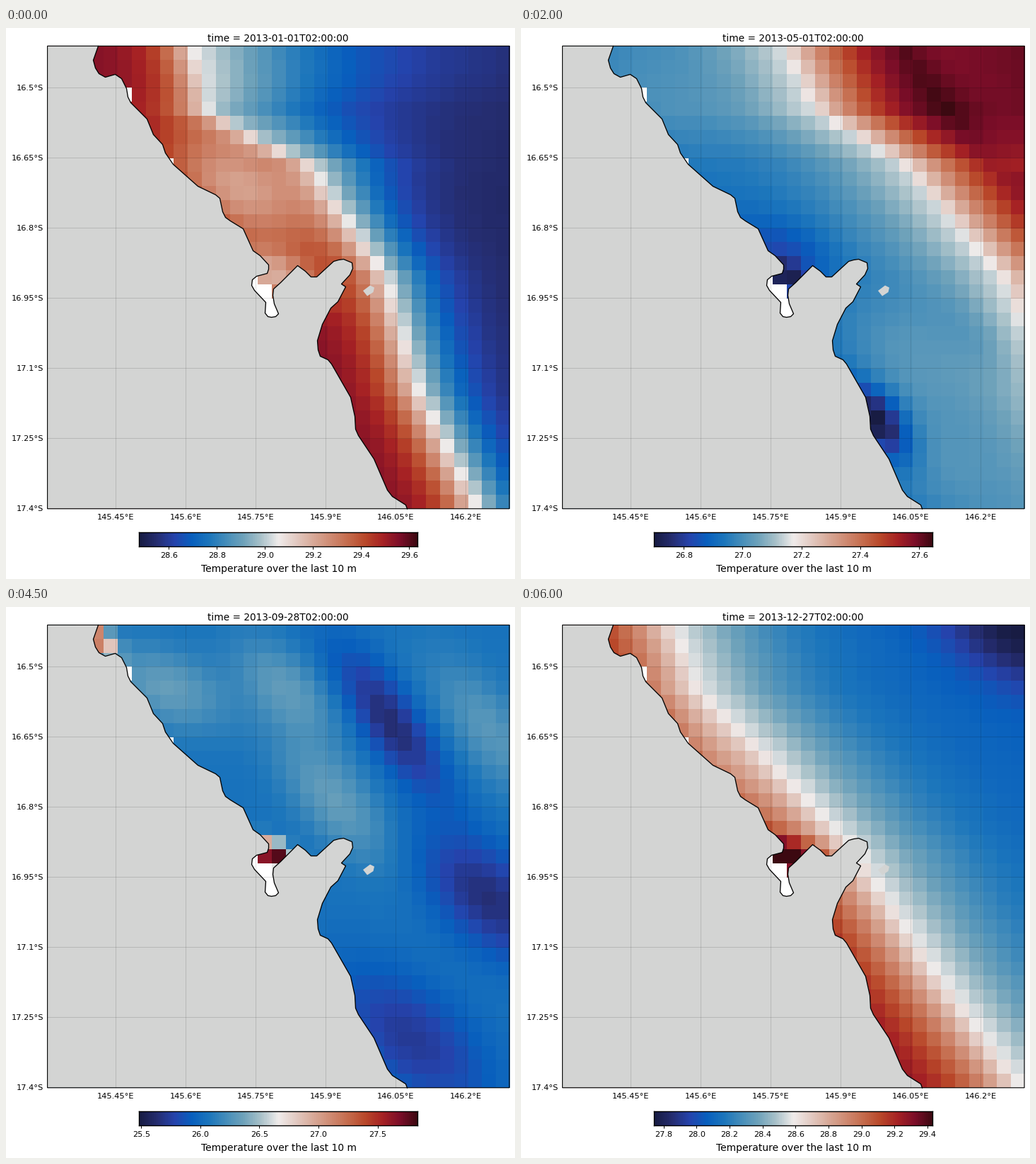
Recreate the animation shown at these times as a matplotlib script. Size 720 by 778 pixels, loop 6.5 s.

```python
import numpy as np
import matplotlib.pyplot as plt
from matplotlib.animation import FuncAnimation
from matplotlib.colors import LinearSegmentedColormap
from matplotlib.patches import Polygon, Rectangle
from matplotlib.path import Path

W, H, DPI = 720, 778, 64
PX = 72 / DPI                      # points per pixel
LEFT, RIGHT, TOP, BOTTOM = 58.6, 712, 25.4, 678.8
N = 33                             # cells per side
CELL = (RIGHT - LEFT) / N
STEPS, INTERVAL = 13, 500
START = np.datetime64("2013-01-01T02:00:00")

plt.rcParams["font.family"] = "DejaVu Sans"

# Diverging blue-white-red colour map
STOPS = ["#181c43", "#252d70", "#2643ac", "#085fbe", "#1c76bc", "#468eba",
         "#70a3bb", "#aac2ca", "#f0eceb", "#e3cbc3", "#d8aa99", "#cf8b73",
         "#c56c4d", "#b9482a", "#a62224", "#7c0e29", "#3c0911"]
CMAP = LinearSegmentedColormap.from_list("thermal", STOPS)

# Coastline in pixels, from north to south
COAST = np.array([
    (130, 25), (123, 45), (126, 56), (131, 64), (140, 69), (154, 65),
    (163, 71), (170, 85), (172, 97), (176, 105), (199, 128), (208, 150),
    (221, 164), (225, 176), (236, 192), (271, 223), (296, 235), (302, 240),
    (306, 259), (310, 267), (317, 272), (335, 283), (349, 314), (359, 321),
    (371, 334), (371, 340), (369, 346), (354, 350), (348, 355), (347, 363),
    (351, 370), (367, 387), (366, 402), (370, 407), (375, 408), (381, 407),
    (385, 403), (379, 389), (377, 377), (378, 368), (388, 359), (412, 335),
    (423, 343), (431, 351), (439, 351), (463, 329), (470, 327), (477, 326),
    (489, 331), (490, 339), (486, 348), (474, 361), (480, 365), (469, 386),
    (459, 395), (447, 418), (440, 441), (441, 454), (444, 463), (455, 468),
    (460, 474), (487, 521), (493, 548), (494, 566), (498, 575), (520, 608),
    (539, 652), (546, 661), (565, 673), (567, 678.5),
]) + 0.5
LAND = np.vstack([COAST, [(LEFT, BOTTOM), (LEFT, TOP)]])
ISLAND = [(505, 371), (515, 363.5), (521, 366.5), (519.5, 373), (511, 378.5)]

ROWS, COLS = np.mgrid[:N, :N]
FRONT_ROWS = (0, 4, 8, 16, 24, 32)
SLANT = 0.6                        # patches lean along the coast
MOUTH, BAY = (3, 0.5), (15.5, 15.9)

months = {}


def add_month(step, limits, front, mid, west, east, patches, spread=0):
    """Temperature front with tanh flanks plus warm and cold patches.

    west and east are (change, width) on each side of the front; each
    patch is (centre, change, width, height) in cells.
    """
    d = COLS - np.interp(ROWS, FRONT_ROWS, front)
    stretch = 1 + spread * np.exp(-(ROWS / 6) ** 2)
    level = mid + np.where(d < 0,
                           west[0] * np.tanh(-d / west[1]),
                           east[0] * np.tanh(d / east[1] / stretch))
    for (x, y), change, width, height in patches:
        dy = ROWS - y
        dx = COLS - x - SLANT * dy
        level = level + change * np.exp(-(dx / width) ** 2
                                        - (dy / height) ** 2)
    low, high = limits
    months[step] = (low + (high - low) * np.clip(level, 0, 1), low, high)


add_month(0, (28.476, 29.635), (10, 11.3, 18.6, 23.7, 26, 30),
          0.5, (0.43, 3), (-0.45, 4), [
              ((13, 9.5), -0.28, 4.5, 4.5),
              (BAY, -0.28, 3, 2),
          ], spread=2.2)
add_month(3, (28.457, 28.986), (24, 27, 30, 42, 50, 50),
          0.5, (0.21, 8), (-0.47, 2.7), [
              ((5, 3), 0.25, 5, 6),
              ((15.5, 14), -0.29, 3, 2.2),
              ((23, 21), 0.2, 4, 4),
              ((29, 20), -0.16, 2.5, 3),
              ((22.3, 25.3), -0.28, 2, 2),
              ((25.5, 29), 0.28, 4.5, 6),
          ])
add_month(5, (24.185, 26.766), (15, 17, 23.3, 30.5, 34, 38.5),
          0.5, (-0.21, 10), (0.5, 8), [
              (BAY, -0.14, 1.5, 1.2),
              ((22, 26.5), -0.18, 1.8, 2.5),
          ])
add_month(7, (22.651, 25.08), (18.2, 21, 26, 31, 35, 40),
          0.5, (-0.45, 8), (0.5, 5), [
              ((9, 5), 0.13, 7, 8),
          ])
add_month(9, (25.482, 27.838), (N,) * 6,
          0.24, (0, 1), (0, 1), [
              (MOUTH, 0.58, 1, 1.2),
              (BAY, 0.85, 1.2, 1),
              ((8, 4), 0.12, 4, 3),
              ((16.5, 4), 0.11, 3, 3.5),
              ((31, 7), 0.1, 3, 5),
              ((20, 12), 0.12, 3, 4.5),
              ((24, 6.5), -0.18, 2.4, 5),
              ((31, 19), -0.17, 4, 4.5),
              ((25.5, 29), -0.14, 4.5, 5),
          ])
add_month(11, (27.048, 29.57), (60, 60, 60, 24, -44, -44),
          0.23, (0.17, 20), (-0.18, 20), [
              (MOUTH, 0.6, 1, 1.4),
              (BAY, 0.75, 1.4, 1),
              ((11.5, 1), -0.12, 2.5, 2),
              ((17.5, 4), 0.12, 2.2, 4),
              ((24, 6), -0.08, 4, 4),
              ((31, 10), 0.1, 2, 5),
              ((25, 14), -0.1, 1.5, 2),
          ])
add_month(12, (27.742, 29.432), (7.6, 9.5, 13.5, 20.6, 26, 32),
          0.5, (0.46, 6), (-0.31, 9), [
              ((10, 9), -0.1, 3, 5),
              ((32, 0), -0.19, 5, 4),
              (BAY, 0.25, 2.5, 1.2),
          ])

centres = np.column_stack([LEFT + CELL * (COLS.ravel() + 0.5),
                           TOP + CELL * (ROWS.ravel() + 0.5)])
sea = ~Path(LAND).contains_points(centres).reshape(N, N)

# Cells without data: two on the coast and the inner bay
empty = np.zeros((N, N), bool)
empty[3, 5] = empty[8, 8] = empty[16, 14] = True
empty[17, 14:16] = empty[18:20, 14:18] = True


def state(step):
    """Temperature field and colour limits at a time step."""
    if step in months:
        field, low, high = months[step]
    else:
        before = max(k for k in months if k < step)
        after = min(k for k in months if k > step)
        t = (step - before) / (after - before)
        field = (1 - t) * months[before][0] + t * months[after][0]
        inside = field[sea & ~empty]
        low, high = inside.min(), inside.max()
    return np.where(empty, np.nan, field), low, high


fig = plt.figure(figsize=(W / DPI, H / DPI), dpi=DPI, facecolor="white")
stage = fig.add_axes([0, 0, 1, 1])
stage.axis("off")


def label(x, y, text, size, ha="center"):
    return stage.text(x, y, text, fontsize=size * PX, ha=ha, va="baseline")


mesh = stage.imshow(np.zeros((N, N)), cmap=CMAP, interpolation="nearest",
                    extent=(LEFT, RIGHT, BOTTOM, TOP), aspect="auto")
stage.set_xlim(0, W)
stage.set_ylim(H, 0)
for shape in (LAND, ISLAND):
    stage.add_patch(Polygon(shape, fc="#d3d4d3", ec="none", zorder=2))
stage.plot(*COAST.T, color="black", lw=1.3 * PX, zorder=3,
           solid_joinstyle="round")

grid = dict(color="black", alpha=0.13, lw=PX, zorder=4, snap=False)
for i in range(6):
    x = 155 + 99 * i
    stage.plot([x + 0.5] * 2, [TOP, BOTTOM], **grid)
    label(x, 694, f"{145.45 + 0.15 * i:.5g}°E", 11.4)
for i in range(7):
    y = 84 + 99 * i
    stage.plot([LEFT, RIGHT], [y + 0.5] * 2, **grid)
    label(53.5, y + 4, f"{16.5 + 0.15 * i:.4g}°S", 11.4, "right")
stage.add_patch(Rectangle((LEFT, TOP), RIGHT - LEFT, BOTTOM - TOP, snap=False,
                          fill=False, ec="black", lw=1.1 * PX, zorder=5))

title = label(385.2, 19, "", 13.6)
label(385.5, 768, "Temperature over the last 10 m", 13.9)

bar = fig.add_axes([188.2 / W, 1 - 732 / H, 394.1 / W, 20 / H])
ramp = bar.imshow(np.linspace(0, 1, 256)[None], cmap=CMAP, aspect="auto")
bar.set_ylim(0, 1)
bar.set_yticks([])
bar.xaxis.set_major_formatter("{x:.1f}")
bar.tick_params(axis="x", length=4 * PX, width=PX, pad=4 * PX,
                labelsize=11.3 * PX)
for spine in bar.spines.values():
    spine.set_linewidth(1.4 * PX)


def update(step):
    field, low, high = state(step)
    mesh.set_data(field)
    mesh.set_clim(low, high)
    ramp.set_extent((low, high, 0, 1))
    bar.set_xlim(low, high)
    title.set_text(f"time = {START + np.timedelta64(30 * step, 'D')}")
    return mesh, ramp, title


anim = FuncAnimation(fig, update, frames=STEPS, interval=INTERVAL,
                     repeat=True, repeat_delay=0, blit=False)
plt.show()
```
